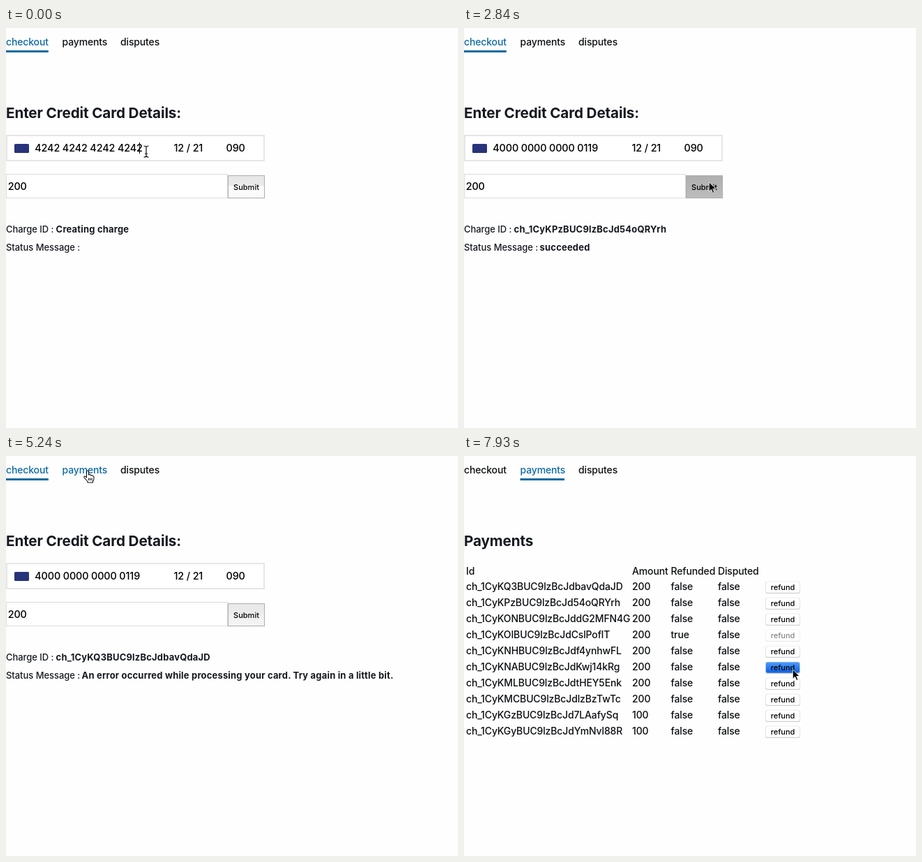
Animation of 648 by 573 pixels, one loop 8 s. Source, as an HTML page:

```html
<!DOCTYPE html>
<html lang="en">
<head>
<meta charset="utf-8">
<title>Checkout demo</title>
<style>
html, body { margin: 0; width: 100%; height: 100%; overflow: hidden; background: #fefefe; }
svg { display: block; width: 648px; height: 573px; }
text { font: 450 14px Inter, sans-serif; font-optical-sizing: none; letter-spacing: -.14px; fill: #0c0e11; white-space: pre; }
.title { font-size: 20.7px; font-weight: 700; letter-spacing: -.15px; fill: #15191f; }
.info { font-size: 13px; letter-spacing: -.05px; fill: #15191f; }
.bold { font-weight: 700; letter-spacing: .18px; }
.field { font-size: 14.4px; fill: #000; }
.btn { font-size: 11px; letter-spacing: 0; text-anchor: middle; fill: #000; }
.off { fill: #858585; }
.on { fill: #0b6aa2; }
</style>
</head>
<body>
<svg id="stage" viewBox="0 0 648 573">
  <defs>
    <linearGradient id="idle" x2="0" y2="1">
      <stop stop-color="#e6e6e6"/><stop offset=".46" stop-color="#eaeaea"/>
      <stop offset=".46" stop-color="#fcfcfc"/><stop offset="1" stop-color="#fafafa"/>
    </linearGradient>
    <linearGradient id="used" x2="0" y2="1">
      <stop stop-color="#e8e8e8"/><stop offset=".46" stop-color="#ececec"/>
      <stop offset=".46" stop-color="#f0f0f0"/><stop offset="1" stop-color="#f4f4f4"/>
    </linearGradient>
    <linearGradient id="down" x2="0" y2="1">
      <stop stop-color="#afafaf"/><stop offset="1" stop-color="#bcbcbc"/>
    </linearGradient>
    <linearGradient id="blue" x2="0" y2="1">
      <stop stop-color="#4f9cf9"/><stop offset="1" stop-color="#0b5fe0"/>
    </linearGradient>
  </defs>

  <g id="tabs"></g>
  <rect id="bar" y="32" height="3" fill="#0b6aa2"/>

  <g id="checkout">
    <text class="title" x="0" y="129">Enter Credit Card Details:</text>
    <rect x="1" y="154" width="369" height="36" fill="#fff" stroke="#e6e6e6" stroke-width="2"/>
    <rect x="12" y="166" width="21" height="13" rx="1.5" fill="#27347b"/>
    <rect id="mark" y="163" height="17" fill="#b3d7fe"/>
    <text class="field" id="number" x="41.3" y="177"></text>
    <text class="field" x="240.5" y="177">12 / 21</text>
    <text class="field" x="315.5" y="177">090</text>
    <rect id="caret" y="164" width="1" height="16"/>
    <rect x=".5" y="209.5" width="317" height="34" fill="#fff" stroke="#dcdcdc"/>
    <text class="field" x="2.7" y="232">200</text>
    <rect id="submit" x="318.5" y="211.5" width="52" height="32" stroke="#adadad"/>
    <text class="btn" x="344.5" y="232">Submit</text>
    <text class="info" x="0" y="293">Charge ID :</text>
    <text class="info bold" id="charge" x="71.6" y="293"></text>
    <text class="info" x="0" y="319">Status Message :</text>
    <text class="info bold" id="status" x="108.6" y="319"></text>
  </g>

  <g id="payments">
    <text class="title" x="0" y="129">Payments</text>
    <g id="head"></g>
    <g id="rows"></g>
  </g>

  <g id="cursor">
    <path id="arrow" d="M.3 .8V14.2L3.5 11.2 5.7 16.4 7.8 15.5 5.7 10.5H10Z" stroke="#fff" stroke-width=".8" stroke-linejoin="round"/>
    <path id="beam" d="M-3.5-8Q0-8 0-6V6Q0 8-3.5 8M3.5-8Q0-8 0-6M0 6Q0 8 3.5 8M-2 3H2" fill="none" stroke="#111" stroke-width="1.2"/>
    <g id="hand" stroke="#111" stroke-width="1.1" stroke-linejoin="round">
      <path fill="#fff" d="M-1.5 1.5Q-1.5 0 0 0T1.5 1.5V6Q3.8 5 4.3 6.6 6.5 6 6.9 7.6 9 7.3 9 9.2V11.5Q9 13.5 7.5 15V17H0V15.5L-4.8 10Q-5.8 8.4-4.3 8-3 7.8-1.5 9.8Z"/>
      <path d="M1.6 10.5V14M3.8 10.5V14M6 10.5V14"/>
    </g>
  </g>
</svg>
<script>
const LOOP = 8000;
const $ = id => document.getElementById(id);
const set = (el, attrs) => { for (const k in attrs) el.setAttribute(k, attrs[k]); return el; };
const show = (id, on) => set($(id), { visibility: on ? 'inherit' : 'hidden' });
const write = (id, str) => { if ($(id).textContent !== str) $(id).textContent = str; };

function add(parent, tag, attrs, str = '') {
  const el = document.createElementNS('http://www.w3.org/2000/svg', tag);
  el.textContent = str;
  return parent.appendChild(set(el, attrs));
}

const tabs = [['checkout', 0], ['payments', 80.5], ['disputes', 164]]
  .map(([name, x]) => add($('tabs'), 'text', { x, y: 25 }, name));

const cols = [3, 241, 296.5, 364];
const line = (parent, cells, y) =>
  cells.forEach((str, i) => add(parent, 'text', { x: cols[i], y }, str));

const chargeId = (a, b) => `ch_1CyK${a}BUC9lzBcJd${b}`;
const ids = [
  ['Q3', 'bavQdaJD'], ['Pz', '54oQRYrh'], ['ON', 'dG2MFN4G'], ['OI', 'CslPoflT'], ['NH', 'f4ynhwFL'],
  ['NA', 'Kwj14kRg'], ['ML', 'tHEY5Enk'], ['MC', 'lzBzTwTc'], ['Gz', '7LAafySq'], ['Gy', 'YmNvl88R']
].map(p => chargeId(...p));

line($('head'), ['Id', 'Amount', 'Refunded', 'Disputed'], 170);
const buttons = ids.map((id, i) => {
  const y = 192 + 23 * i, refunded = i === 3, g = $('rows');
  line(g, [id, i < 8 ? '200' : '100', String(refunded), 'false'], y);
  add(g, 'rect', { x: 432, y: y - 12, width: 50, height: 17, rx: 3.5, fill: refunded ? '#e6e6e6' : '#c9c9c9' });
  const face = add(g, 'rect', { x: 432.5, y: y - 12, width: 49, height: 16, rx: 3, fill: '#fff',
    stroke: refunded ? '#f0f0f0' : '#e2e2e2', 'stroke-width': .6 });
  add(g, 'text', { class: refunded ? 'btn off' : 'btn', x: 457, y }, 'refund');
  return face;
});

// pointer moves: first step, last step, number of steps, end point
const moves = [
  [150, 600, 4, 33, 172],
  [1950, 2840, 7, 351, 220],
  [3890, 4340, 4, 230, 94],
  [4640, 5240, 5, 117, 21],
  [6290, 6440, 2, 130, 34],
  [6590, 7330, 6, 469, 307],
  [7480, 7480, 1, 471, 305]
];
const ease = p => p * p * (3 - 2 * p);

function pointer(t) {
  let x = 201, y = 177;
  for (const [t0, t1, n, ex, ey] of moves) {
    if (t < t0) break;
    const gap = n > 1 ? (t1 - t0) / (n - 1) : 1;
    const p = ease(Math.min(n, Math.floor((t - t0) / gap + .02) + 1) / n);
    x += (ex - x) * p;
    y += (ey - y) * p;
  }
  return [x, y];
}

function draw(t) {
  const [x, y] = pointer(t);
  const paid = t >= 5540;
  const overTab = y < 42 && x > 80 && x < 144;
  const overField = !paid && x > 41 && (y > 153 && y < 191 && x < 370 || y > 209 && y < 244 && x < 318);

  set($('cursor'), { transform: `translate(${x.toFixed(1)} ${y.toFixed(1)})` });
  show('hand', overTab);
  show('beam', overField);
  show('arrow', !overTab && !overField);

  show('checkout', !paid);
  show('payments', paid);
  show('rows', t >= 6290);
  set($('bar'), paid ? { x: 80.5, width: 63.5 } : { x: 0, width: 60.8 });
  set(tabs[0], { class: paid ? '' : 'on' });
  set(tabs[1], { class: paid || overTab ? 'on' : '' });

  // number is selected by dragging left, then replaced
  const left = Math.max(41.5, Math.min(191, x));
  show('mark', !paid && t >= 150 && t < 1650);
  set($('mark'), { x: left, width: 191 - left });
  write('number', t < 1650 ? '4242 4242 4242 4242' : '4000 0000 0000 0119');
  show('caret', !paid && (t < 150 || t >= 1650 && t < 2250));
  set($('caret'), { x: t < 150 ? 191 : 283 });

  const state = t < 2840 ? 'idle' : t < 3140 ? 'down' : 'used';
  set($('submit'), { fill: `url(#${state})` });

  write('charge', t < 450 ? 'Creating charge' : t < 3140 ? ids[1]
    : t < 3590 ? 'Creating token' : t < 4040 ? 'Creating charge' : ids[0]);
  write('status', t < 450 ? '' : t < 4040 ? 'succeeded'
    : 'An error occurred while processing your card. Try again in a little bit.');

  set(buttons[5], { fill: t >= 7930 ? 'url(#blue)' : '#fff' });
}

const start = performance.now();
function tick() {
  draw((performance.now() - start) % LOOP);
  requestAnimationFrame(tick);
}
tick();
</script>
</body>
</html>
```
